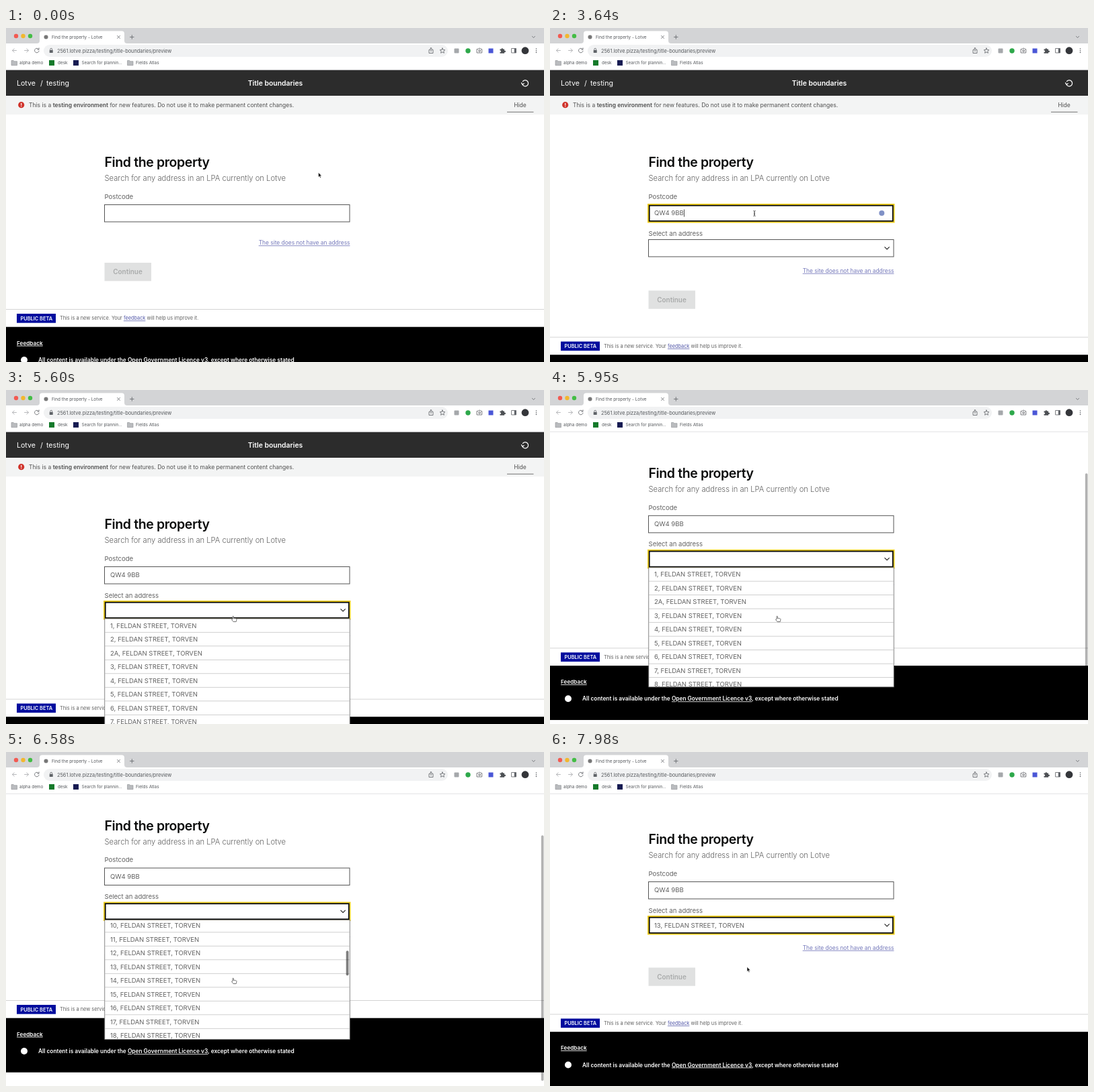
Write an HTML page that moves like this. It is 800x498 px and loops after 8 s.

```html
<!DOCTYPE html>
<html lang="en">
<head>
<meta charset="utf-8">
<title>Title boundaries</title>
<style>
  html, body { margin: 0; width: 100%; height: 100%; overflow: hidden; background: #fff; }
  svg { display: block; width: 100vw; height: 100vh; }
  text { font-family: Inter, Roboto, sans-serif; white-space: pre; }
  .u { text-decoration: underline; text-decoration-thickness: .7px; text-underline-offset: 1.3px; }
  .icon { fill: none; stroke: #6b6e72; stroke-width: .9; stroke-linecap: round; stroke-linejoin: round; }
  .faint { stroke: #b0b2b5; }
</style>
</head>
<body>
<svg id="stage" viewBox="0 0 800 498" xmlns="http://www.w3.org/2000/svg"></svg>
<script>
const LOOP = 8000, BLINK = 1060;
const ROW = 20.5, ROWS = 42, LIST_TOP = 341, LIST_H = 178, SHIFT = 41.5;
const POSTCODE = 'QW4 9BB';
const FOCUS = 1200, TIP = 1260, TYPE = 2150, KEY = 170, LOOKUP = 3380;
const OPEN = 4900, PICK = 7260;
const LAST_KEY = TYPE + KEY * (POSTCODE.length - 1);
const INK = '#626262', BLUE = '#000d9e', UI = '#55585c';

const text = (x, y, size, fill, body, more = '') =>
  `<text x="${x}" y="${y}" font-size="${size}" fill="${fill}" ${more}>${body}</text>`;
const rect = (x, y, w, h, fill, more = '') =>
  `<rect x="${x}" y="${y}" width="${w}" height="${h}" fill="${fill}" ${more}/>`;
const dot = (x, y, r, fill) => `<circle cx="${x}" cy="${y}" r="${r}" fill="${fill}"/>`;
const icon = (d, more = '') => `<path class="icon ${more}" d="${d}"/>`;
const semi = 'font-weight="600"', mid = 'text-anchor="middle"', strong = `${semi} ${mid}`;

const address = i => `${i < 2 ? i + 1 : i === 2 ? '2A' : i}, FELDAN STREET, TORVEN`;
const folder = x => `<path d="M${x} 48.5h3.2l1 1.2h4.3v6h-8.5z" fill="#b9bbbe" stroke="#8d9094" stroke-width=".6"/>`;

// One input box: plain border, plus a yellow and black ring for focus.
const box = (id, y) => `
  ${rect(146.5, y, 364.5, 25.5, '#fff', 'stroke="#555"')}
  <g id="${id}">
    ${rect(146, y - .5, 365.5, 26.5, 'none', 'stroke="#f0cd1a" stroke-width="2"')}
    ${rect(147.7, y + 1.2, 362.1, 23.1, '#fff', 'stroke="#0b0c0c" stroke-width="1.8"')}
  </g>`;

function chrome() {
  return `
  ${rect(0, 0, 800, 62, '#fff')}
  ${rect(0, 0, 800, 23, '#d3d4d6')}
  <path d="M46 23q4 0 4-4V8.5q0-4 4-4h118q4 0 4 4V19q0 4 4 4z" fill="#fff"/>
  ${dot(15, 12, 3.2, '#f25a52')}${dot(25.5, 12, 3.2, '#f2b72f')}${dot(36, 12, 3.2, '#43bd45')}
  ${dot(59.5, 13.5, 3, '#777')}
  ${text(68, 16, 6.4, UI, 'Find the property - Lotve')}
  ${icon('M165.6 11.6l3.8 3.8m0-3.8l-3.8 3.8M184.5 13.5h5.6m-2.8-2.8v5.6M782.5 12.5l2 2 2-2')}
  ${icon('M15.5 33.5h-6m2.7-2.7l-2.7 2.7 2.7 2.7M27.5 33.5h6m-2.7-2.7l2.7 2.7-2.7 2.7', 'faint')}
  ${icon('M48.6 31.7a3.3 3.3 0 1 0 .5 2.5M49 29.8v2.3h-2.3')}
  ${rect(56, 25, 601, 18, '#f1f2f3', 'rx="9"')}
  ${rect(64.7, 33, 5, 4, '#5f6368', 'rx=".6"')}
  ${icon('M65.8 33v-1.3a1.4 1.4 0 0 1 2.8 0V33')}
  ${text(76, 36.5, 7.36, UI, '2561.lotve.pizza/testing/title-boundaries/preview')}
  ${icon('M630.5 32.5h-1.5v5h6v-5h-1.5M632 35v-5.5m-1.6 1.6l1.6-1.6 1.6 1.6')}
  ${icon('M649 30l1.1 2.5 2.7.3-2 1.8.6 2.7-2.4-1.4-2.4 1.4.6-2.7-2-1.8 2.7-.3z')}
  ${rect(666.5, 30.5, 7, 7, '#a5a8ab', 'rx="1"')}
  ${dot(687, 34, 3.7, '#2da84a')}
  ${icon('M700.5 31.5h1.7l.8-1.2h2.2l.8 1.2h1.7v5.5h-7.2z')}
  <circle class="icon" cx="704.1" cy="34" r="1.4"/>
  ${rect(717.5, 30.5, 7, 7, '#4a56d6')}
  <path d="M734.5 31.5h2a1.3 1.3 0 1 1 2.6 0h2v2.3a1.3 1.3 0 1 1 0 2.3v1.7h-6.6v-2a1.2 1.2 0 1 0 0-2.3z" fill="#4d5054"/>
  ${icon('M752 30.5h6.5v6.5h-6.5z')}${rect(755.8, 30.5, 2.7, 6.5, '#5f6368')}
  ${dot(772, 33.7, 5.4, '#34363a')}
  ${[31, 33.7, 36.4].map(y => dot(788.5, y, .8, '#5f6368')).join('')}
  ${folder(8)}${text(20, 54.3, 6.4, UI, 'alpha demo')}
  ${rect(64, 48, 8, 8, '#157a2b')}${text(77, 54.3, 6.4, UI, 'desk')}
  ${rect(100, 48, 8, 8, '#161b52')}${text(112.5, 54.3, 6.35, UI, 'Search for plannin…')}
  ${folder(180.5)}${text(193, 54.3, 6.4, UI, 'Fields Atlas')}
  ${rect(0, 61.8, 800, .8, '#d9dadc')}`;
}

function header() {
  return `
  ${rect(0, 62.5, 800, 38.5, '#2c2c2c')}
  ${text(16, 85.7, 10.6, '#fff', 'Lotve')}
  ${text(51, 85.7, 10.6, '#fff', '/')}
  ${text(60, 85.7, 10.6, '#fff', 'testing')}
  ${text(400.5, 85.7, 10.4, '#fff', 'Title boundaries', strong)}
  <path d="M768 84.3a4.5 4.5 0 1 0 .2-4.2M766.3 81.4l1.6 2.9 2.8-1.7" fill="none" stroke="#fff" stroke-width="1.2"/>
  ${rect(0, 101, 800, 28, '#f3f4f4')}
  ${dot(22.7, 114.7, 4.6, '#d0342c')}
  ${rect(22.1, 111.9, 1.2, 3.4, '#fff')}${rect(22.1, 116.1, 1.2, 1.2, '#fff')}
  ${text(34, 117.6, 8.52, '#505050', `This is a <tspan ${semi}>testing environment</tspan> for new features. Do not use it to make permanent content changes.`)}
  ${text(764.5, 117.6, 8.5, '#505050', 'Hide', mid)}
  ${rect(745, 124.8, 39.5, .9, '#666')}`;
}

function below() {
  return `
  <g id="lower">
    ${text(511.5, 323.3, 8.4, '#7478ba', 'The site does not have an address', 'text-anchor="end" class="u"')}
    ${rect(146.5, 350, 69.5, 27.3, '#e0e1e1')}
    ${text(181, 367.3, 9.95, '#a9abab', 'Continue', strong)}
    ${rect(0, 419.1, 800, .9, '#cfcfcf')}
    ${rect(16, 426, 58, 13.7, BLUE)}
    ${text(45.3, 435.6, 7.4, '#fff', 'PUBLIC BETA', strong)}
    ${text(80, 435.4, 7.35, INK, 'This is a new service. Your <tspan class="u" fill="#5257a8">feedback</tspan> will help us improve it.')}
    ${rect(0, 445.7, 800, 81, '#000')}
    ${text(16, 472.7, 8.2, '#fff', 'Feedback', semi + ' class="u"')}
    ${dot(27, 495, 5, '#fff')}
    ${text(48, 498, 8.33, '#fff', 'All content is available under the <tspan class="u">Open Government Licence v3</tspan>, except where otherwise stated', semi)}
  </g>`;
}

function list() {
  let rows = '';
  for (let i = 0; i < ROWS; i++) {
    const y = LIST_TOP + ROW * i;
    rows += text(155, y + 13.6, 9.5, INK, address(i), 'class="row"') +
      rect(147, y + ROW - .6, 364, .8, '#c4c4c4');
  }
  return `
  <g id="list">
    ${rect(145.8, LIST_TOP, 366.4, LIST_H + 1, '#000', 'opacity=".12"')}
    ${rect(146.8, LIST_TOP, 364.4, LIST_H, '#fff', 'stroke="#777" stroke-width=".8"')}
    <g clip-path="url(#listClip)">
      <g id="rows">${rect(147, 0, 364, ROW, BLUE, 'id="mark"')}${rows}</g>
      ${rect(505.7, 0, 3.8, 37, '#000', 'rx="1.9" opacity=".5" id="listThumb"')}
    </g>
  </g>`;
}

document.getElementById('stage').innerHTML = `
  <defs>
    <clipPath id="view">${rect(0, 62, 800, 436, '#000')}</clipPath>
    <clipPath id="listClip">${rect(147, LIST_TOP, 364, LIST_H, '#000')}</clipPath>
  </defs>
  ${rect(0, 0, 800, 498, '#fff')}
  <g clip-path="url(#view)">
    <g id="page">
      ${header()}
      ${text(146.5, 207, 19.5, '#0b0c0c', 'Find the property', semi + ' letter-spacing="-.02em"')}
      ${text(146.5, 228.2, 11.2, INK, 'Search for any address in an LPA currently on Lotve', 'font-weight="300"')}
      ${text(146.5, 254.7, 9.6, INK, 'Postcode')}
      ${box('codeRing', 263.5)}
      ${text(155, 279.4, 9.6, INK, '', 'id="code"')}
      ${rect(0, 270.5, .8, 11, '#222', 'id="codeCaret"')}
      <circle id="key" cx="493.3" cy="276" r="4" fill="#8091c6"/>
      ${below()}
      <g id="pick">
        ${text(146.5, 309.5, 9.55, INK, 'Select an address')}
        ${box('pickRing', 315.5)}
        ${text(155, 331.5, 9.5, INK, address(13), 'id="chosen"')}
        ${rect(155.2, 322.5, .8, 11.5, '#777', 'id="pickCaret"')}
        <path d="M497.5 326.3l3.6 3.6 3.6-3.6" fill="none" stroke="#222" stroke-width="1.1"/>
      </g>
      ${list()}
      <g id="tip">
        ${rect(410.5, 243.3, 165.5, 24.2, '#000', 'rx="3"')}
        <path d="M489 267.3h8.6l-4.3 3.4z"/>
        ${text(493.3, 253.4, 7.1, '#fff', 'Press the KeyHollow icon in your browser’s', strong)}
        ${text(493.3, 263, 7.1, '#fff', 'toolbar to unlock', strong)}
      </g>
    </g>
    ${rect(795.8, 0, 3.7, 366, '#000', 'rx="1.8" opacity=".3" id="pageThumb"')}
  </g>
  ${chrome()}
  <g id="cursor">
    <path id="arrow" d="M0-3.5v7l1.6-1.5 1.1 2.5 1.2-.5-1.1-2.4h2.2z" fill="#111" stroke="#fff" stroke-width=".5"/>
    <path id="beam" d="M-1.7-4q1.7 0 1.7 1v6q0 1-1.7 1M1.7-4q-1.7 0-1.7 1v6q0 1 1.7 1M-.9.8h1.8" fill="none" stroke="#444" stroke-width=".8"/>
    <path id="hand" d="M-1.5.5v-4q0-.8.7-.8t.7.8v2.4q2-.4 4 .6.7.3.5 1.5l-.7 3h-4.2l-2.3-2.9q-.2-.9.6-.9z" fill="#fff" stroke="#555" stroke-width=".8"/>
  </g>`;

const $ = {};
document.querySelectorAll('svg [id]').forEach(e => $[e.id] = e);
const rowTexts = [...document.querySelectorAll('.row')];

const show = (el, on) => el.setAttribute('visibility', on ? 'inherit' : 'hidden');
const move = (el, x, y) => el.setAttribute('transform', `translate(${x} ${y})`);
const part = (t, a, b) => Math.min(1, Math.max(0, (t - a) / (b - a)));
const smooth = p => p * p * (3 - 2 * p);
const out = p => 1 - (1 - p) ** 2;
const between = (t, a, b) => t >= a && t < b;
const blink = (t, from) => (t - from) % BLINK < BLINK / 2;

const path = [
  [0, 464.5, 219], [550, 464.5, 219], [1150, 304, 276], [3850, 304, 276.5],
  [4650, 338.5, 338], [5100, 338.5, 341.5], [7380, 338.5, 341.5], [7820, 293, 324]
];
function pointer(t) {
  let k = path.length - 1;
  while (path[k][0] > t) k--;
  const a = path[k], b = path[k + 1] || a;
  const p = a === b ? 0 : smooth(part(t, a[0], b[0]));
  return [a[1] + (b[1] - a[1]) * p, a[2] + (b[2] - a[2]) * p];
}

function draw(t) {
  // The page scrolls past its end and springs back.
  const scroll = 90.5 * out(part(t, 5650, 6150)) - 20.5 * out(part(t, 6750, 6965));
  const listScroll = 213 * out(part(t, 6040, 6690));
  const open = between(t, OPEN + 60, PICK);
  const found = t >= LOOKUP;
  const inCode = between(t, FOCUS, OPEN);

  move($.page, 0, -scroll);
  move($.lower, 0, found ? SHIFT : 0);
  show($.pageThumb, between(t, 5680, 6860));
  $.pageThumb.setAttribute('y', 64 + Math.min(scroll, 70) * .86);

  const typed = t < TYPE ? 0 : Math.min(POSTCODE.length, Math.floor((t - TYPE) / KEY) + 1);
  $.code.textContent = POSTCODE.slice(0, typed);
  show($.codeRing, inCode);
  show($.key, inCode);
  show($.tip, between(t, TIP, TYPE));
  const caretFrom = t < TYPE ? FOCUS : Math.min(t, LAST_KEY);
  show($.codeCaret, inCode && blink(t, caretFrom));
  $.codeCaret.setAttribute('x', 155.3 + (typed ? $.code.getComputedTextLength() : 0));

  show($.pick, found);
  show($.pickRing, t >= OPEN);
  show($.chosen, t >= PICK);
  show($.pickCaret, open && blink(t, OPEN));

  show($.list, open);
  move($.rows, 0, -listScroll);
  const hot = t < 6710 ? -1 : t < 7000 ? 14 : 13;
  show($.mark, open && hot >= 0);
  $.mark.setAttribute('y', LIST_TOP + ROW * Math.max(hot, 0));
  rowTexts.forEach((e, i) => {
    e.setAttribute('fill', i === hot ? '#fff' : INK);
    e.setAttribute('font-weight', i === hot ? 600 : 400);
  });
  show($.listThumb, open && between(t, 6040, 7060));
  $.listThumb.setAttribute('y', LIST_TOP + 3 + listScroll * LIST_H / (ROWS * ROW));

  const [x, y] = pointer(t);
  const beam = x < 511 && between(y, 263, 290) && t < OPEN;
  const hand = found && y > 315 && t < PICK;
  move($.cursor, x, y);
  show($.beam, beam);
  show($.hand, hand);
  show($.arrow, !beam && !hand);
}

const start = performance.now();
function tick() {
  draw((performance.now() - start) % LOOP);
  requestAnimationFrame(tick);
}
tick();
</script>
</body>
</html>
```
